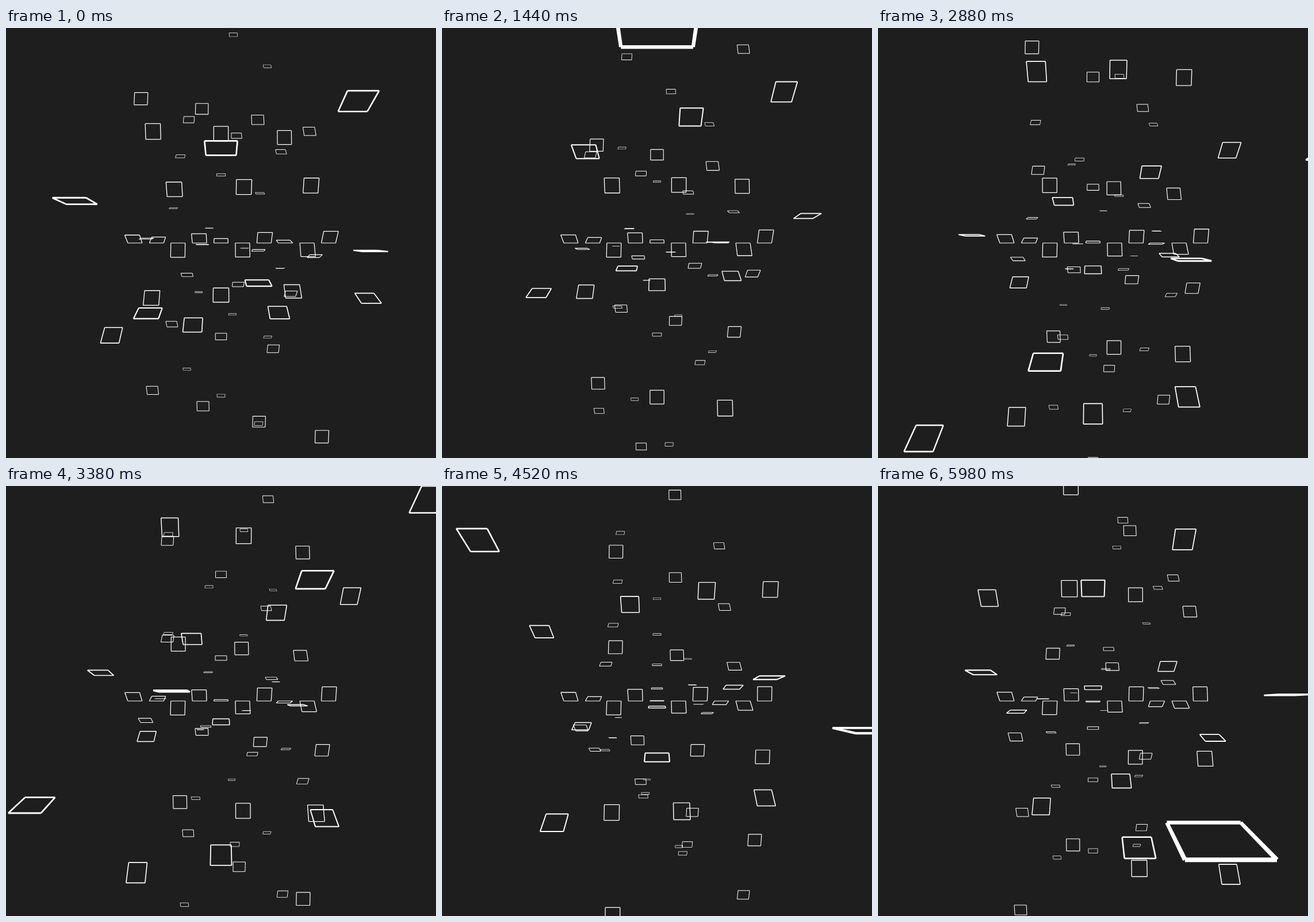
Animation, 748 px wide and 748 px high, one loop 6000 ms. Source, as an HTML page with a canvas:

```html
<!DOCTYPE html>
<html lang="en">
<head>
<meta charset="utf-8">
<title>Turning squares</title>
<style>
  html, body { margin: 0; width: 100%; height: 100%; overflow: hidden; background: #1e1e1e; }
  canvas { display: block; }
</style>
</head>
<body>
<canvas id="stage" width="748" height="748"></canvas>
<script>
const ctx = document.getElementById('stage').getContext('2d');

const SIZE = 748, WORLD = 750, ZOOM = SIZE / WORLD;
const EYE = WORLD / 2 / Math.tan(Math.PI / 6);
const NEAR = EYE / 10;
const COUNT = 10, SIDE = 25, COL_GAP = 37.5, ROW_GAP = 87.5, STROKE = 1.25;
const LOOP = 6000, STEP = 20;
const FIRST_STEP = 8151, DEG_PER_STEP = 0.015;

// Perspective projection; s is the local scale.
function project(x, y, z) {
  const s = EYE / (EYE - z) * ZOOM;
  return { x: SIZE / 2 + x * s, y: SIZE / 2 + y * s, s };
}

// A butt-ended line whose width follows the scale at each end.
function addEdge(a, b) {
  const dx = b.x - a.x, dy = b.y - a.y;
  const len = Math.hypot(dx, dy);
  if (len < 1e-6) return;
  const nx = -dy / len * STROKE / 2, ny = dx / len * STROKE / 2;
  ctx.moveTo(a.x + nx * a.s, a.y + ny * a.s);
  ctx.lineTo(b.x + nx * b.s, b.y + ny * b.s);
  ctx.lineTo(b.x - nx * b.s, b.y - ny * b.s);
  ctx.lineTo(a.x - nx * a.s, a.y - ny * a.s);
  ctx.closePath();
}

function drawSquare(col, row, angle) {
  const cos = Math.cos(angle), sin = Math.sin(angle);
  const inner = row * ROW_GAP, outer = inner + SIDE;
  if (EYE - outer * sin < NEAR) return;
  const left = (col - 4) * COL_GAP - SIDE / 2, right = left + SIDE;
  const corner = (x, r) => project(x, r * cos, r * sin);
  const pts = [corner(left, inner), corner(right, inner), corner(right, outer), corner(left, outer)];
  ctx.beginPath();
  pts.forEach((p, i) => addEdge(p, pts[(i + 1) % 4]));
  ctx.fill();
}

function draw(time) {
  const step = FIRST_STEP + Math.floor((time % LOOP) / STEP);
  const unit = step * DEG_PER_STEP * Math.PI / 180;
  ctx.fillStyle = '#1e1e1e';
  ctx.fillRect(0, 0, SIZE, SIZE);
  ctx.fillStyle = '#fff';
  // Each square turns about the middle axis in proportion to its index.
  for (let row = 0; row < COUNT; row++) {
    for (let col = 0; col < COUNT; col++) {
      drawSquare(col, row, unit * (row * COUNT + col + 1));
    }
  }
}

const start = performance.now();
function tick() {
  draw(performance.now() - start);
  requestAnimationFrame(tick);
}
tick();
</script>
</body>
</html>
```
